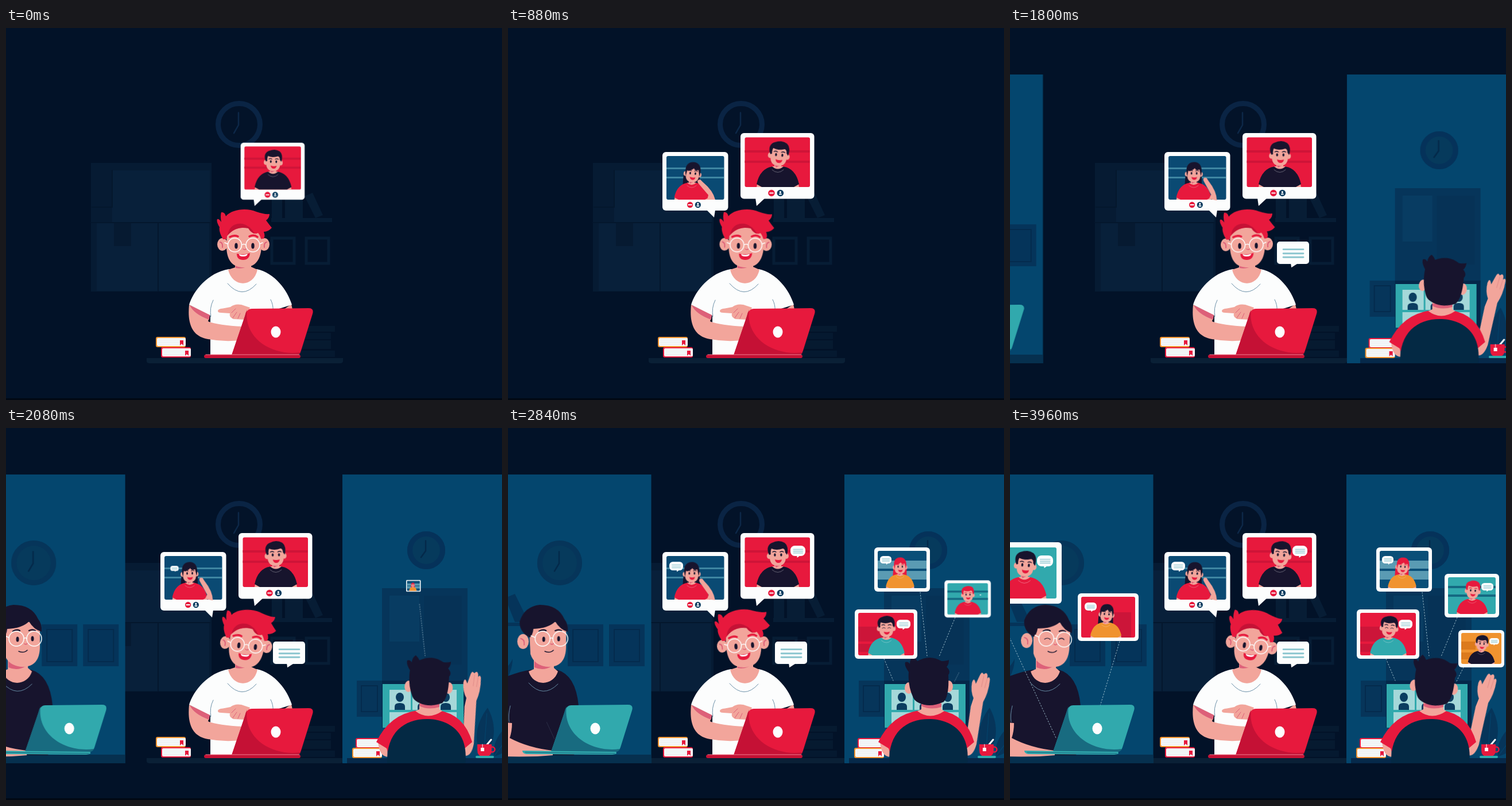
Recreate the animation shown at these times as an HTML page. Size 864 by 648 pixels, loop 4000 ms.

```html
<!DOCTYPE html>
<html lang="en">
<head>
<meta charset="utf-8">
<title>Video call</title>
<style>
html, body { margin: 0; width: 100%; height: 100%; overflow: hidden; background: #021228; }
svg { display: block; width: 100vw; height: 100vh; }
</style>
</head>
<body>
<svg id="stage" viewBox="0 0 864 648" fill="none"></svg>
<script>
const LOOP = 4000;
const RED = '#e7193d', DEEP = '#c51135', SKIN = '#f2a59b', PINK = '#dd6079', INK = '#17142d',
  WHITE = '#fcfdfd', NAVY = '#0b3d60', TEAL = '#31a9ad', ORANGE = '#f0932f', WALL = '#04466e';
const OUT = 'cubic-bezier(.5,1,.89,1)', SINE = 'cubic-bezier(.37,0,.63,1)';

// ---- drawing helpers ----
const path = (d, fill) => `<path d="${d}" fill="${fill}"/>`;
const line = (d, color, width = 1, extra = '') =>
  `<path d="${d}" stroke="${color}" stroke-width="${width}" stroke-linecap="round" ${extra}/>`;
const rect = (x, y, w, h, fill, r = 0) =>
  `<rect x="${x}" y="${y}" width="${w}" height="${h}" rx="${r}" fill="${fill}"/>`;
const oval = (x, y, rx, ry, fill) => `<ellipse cx="${x}" cy="${y}" rx="${rx}" ry="${ry}" fill="${fill}"/>`;
const ring = (x, y, r, color, width) =>
  `<circle cx="${x}" cy="${y}" r="${r}" stroke="${color}" stroke-width="${width}"/>`;
const frame = (x, y, w, h, color, width) =>
  `<rect x="${x}" y="${y}" width="${w}" height="${h}" stroke="${color}" stroke-width="${width}"/>`;

// ---- motion helpers ----
const moves = [];
function moving(body, keys, format, ease, origin = [0, 0]) {
  const id = 'm' + moves.length;
  moves.push({ id, keys, format, ease });
  return `<g id="${id}" style="transform-origin:${origin[0]}px ${origin[1]}px">${body}</g>`;
}
const scale = v => ({ transform: `scale(${v})` });
const rotate = v => ({ transform: `rotate(${v}deg)` });
const shift = v => ({ transform: `translateX(${v}px)` });
const fade = v => ({ opacity: v });
const pop = (body, x, y, start, length = 360, from = 0) =>
  moving(body, [[start, from], [start + length, 1]], scale, OUT, [x, y]);
const sway = (body, x, y, keys) => moving(body, keys, rotate, SINE, [x, y]);
const slide = (body, from, start, end) => moving(body, [[start, from], [end, 0]], shift, OUT);
const thread = (x1, y1, x2, y2, start) =>
  pop(line(`M${x1} ${y1}L${x2} ${y2}`, '#a3c2d0', .9, 'stroke-dasharray="2 3"'), x2, y2, start, 320);

// ---- shared props ----
function book(x, y, cover, mark) {
  const rules = [4, 7, 10, 13].map(d => line(`M${x + 4} ${y + d}H${x + 49}`, '#cfd8de', .7)).join('');
  return rect(x, y, 52, 18, cover, 3) + rect(x + 2, y + 2, 50, 14, WHITE, 2) + rules +
    path(`M${mark} ${y + 6}h6v9l-3 -3l-3 3Z`, RED);
}

function bubble(x, y, w, h, start, right) {
  const tip = x + w * (right ? .45 : .55);
  const rules = [.35, .53, .7].map(k =>
    line(`M${x + w * .2} ${y + h * k}H${x + w * .82}`, '#8cc6cf', h * .075)).join('');
  return pop(rect(x, y, w, h, WHITE, h * (h > 30 ? .13 : .42)) +
    path(`M${tip - w * .02} ${y + h - 1}L${tip} ${y + h * 1.16}L${tip + w * .2} ${y + h - 1}Z`, WHITE) + rules,
    tip, y + h * 1.16, start, 280);
}

const NOD = [[0, 2], [600, 6], [1400, 6], [1800, 1], [2440, -5], [3280, 5], [4000, 5]];
function avatar({ x, y, size, hair = INK, shirt, long, asleep, nod = NOD }) {
  const eye = ex => asleep ? line(`M${ex - 3} -55q3 -3 6 0`, INK, 1) : oval(ex, -56, 1.7, 2.8, INK);
  const head = oval(-15, -54, 4, 5, SKIN) + oval(15, -54, 4, 5, SKIN) +
    path('M-14 -68H14V-52C14 -41 8 -37 0 -37S-14 -41 -14 -52Z', SKIN) +
    (long
      ? path('M-14 -49C-20 -73 -10 -80 1 -80S20 -70 15 -50L12 -64Q4 -61 2 -67Q-5 -60 -12 -61Z', hair)
      : path('M-15 -56C-20 -66 -17 -74 -10 -77Q2 -83 12 -77Q20 -70 16 -56L13 -60Q13 -66 9 -67Q-2 -63 -11 -67Q-13 -62 -12 -57Z', hair)) +
    line('M-9 -61q3 -2 6 0M4 -61q3 -2 6 0', hair, 1.4) + eye(-5) + eye(6) +
    path('M-5 -48Q1 -46 7 -48Q6 -42 1 -42T-5 -48Z', RED);
  return `<g transform="translate(${x} ${y}) scale(${size})">` +
    (long ? path('M-17 -58L-20 -18H17L17 -58Z', hair) : '') +
    path('M-37 0L-35 -9H35L37 0Z', SKIN) +
    path('M-37 -5Q-31 -33 -8 -36H8Q31 -33 37 -5L28 0H-28Z', shirt) +
    path('M-6 -44H6V-36H10Q0 -27 -10 -36H-6Z', SKIN) + path('M-6 -39H6L-3 -34Z', PINK) +
    line('M-10 -30Q0 -21 10 -30', '#ffffff66', .8) +
    sway(head, 0, -38, nod) + '</g>';
}

function stripes(x, w, color, rows) {
  return rows.map(([y, h]) => rect(x, y, w, h, color)).join('');
}

function card({ x, y, w, h, bg, bands = '', who, talk, tail, start, from, origin, pad = 6, foot = 6 }) {
  const controls = tail ? (() => {
    const cx = x + w * .42, cy = y + h - 10, r = w * .045;
    return oval(cx, cy, r, r, RED) + rect(cx - 3.5, cy - 1, 7, 2, WHITE) +
      oval(cx + w * .12, cy, r, r, NAVY) + oval(cx + w * .12, cy - 1.5, 1.5, 2, WHITE) +
      rect(cx + w * .12 - 2.5, cy + 1, 5, 2, WHITE, 1);
  })() : '';
  const body = (tail ? path(tail, WHITE) : '') + rect(x, y, w, h, WHITE, 6) +
    rect(x + pad, y + pad, w - 2 * pad, h - pad - foot, bg, 3) + bands + avatar(who) +
    (who.extra || '') + controls + bubble(...talk);
  return pop(body, ...origin, start, 360, from);
}

function clock(x, y, r, rim, face, hands) {
  return oval(x, y, r, r, face) + ring(x, y, r - 4.5, rim, 9) +
    line(`M${x - 1} ${y - r / 2}V${y + 1}L${x - 9} ${y + r * .37}`, hands, 2.5);
}

function laptop(x, y, lid, shade) {
  return `<g transform="translate(${x} ${y})">` +
    path('M35 1L134 0Q144 0 141 10L121 74Q119 81 112 82H0L25 9Q28 1 35 1Z', lid) +
    path('M27 3Q24 8 23 14L0 82H112Q119 81 120 77C70 84 20 52 27 3Z', shade) +
    oval(77, 41.5, 8.5, 10, WHITE) + '</g>';
}

const glasses = (x1, x2, y, r, arms) => ring(x1, y, r, WHITE, 1.5) + ring(x2, y, r, WHITE, 1.5) +
  line(`M${x1 + r} ${y}q${(x2 - x1) / 2 - r} -3 ${x2 - x1 - 2 * r} 0${arms}`, WHITE, 1.4);

// ---- middle room ----
function middleRoom() {
  const dim = '#071d35', dark = '#04172d';
  return clock(406, 168, 41, '#0a2444', '#031329', '#0d2848') +
    rect(148, 235, 210, 224, '#061b33') + rect(185, 248, 170, 90, '#08203a') +
    rect(158, 340, 196, 118, '#08203a') + rect(188, 338, 30, 42, '#061a31') +
    line('M148 339H356M265 340V458M185 248V312H150', dark, 2) +
    rect(462, 331, 106, 7, dim) + rect(463, 296, 18, 35, dim) + rect(486, 292, 31, 39, dim) +
    path('M520 293L534 287L552 326L539 331Z', dim) +
    frame(463, 366, 39, 44, dim, 5) + frame(523, 366, 39, 44, dim, 5) +
    rect(515, 519, 58, 10, '#061a30') + rect(512, 531, 54, 11, '#051930') +
    rect(515, 544, 51, 15, '#061a30') + rect(510, 562, 63, 11, '#051930') +
    path('M245 575H587V580Q587 584 582 584H250Q245 584 245 580Z', '#0a2036');
}

function presenter() {
  const head = oval(377, 377, 9, 11, SKIN) + oval(450, 377, 9, 11, SKIN) +
    line('M373 373q5 1 4 9M454 373q-5 1 -4 9', PINK, 2) +
    path('M385 345H445V382C443 408 431 417 414 417S385 408 384 382Z', SKIN) +
    path('M378 368C372 358 371 350 372 347Q366 337 368 333Q371 332 375 338Q373 327 375 321Q381 320 383 328C394 315 420 313 436 320Q450 325 459 324Q459 331 453 335Q458 342 463 348Q457 355 449 355Q452 362 449 367H444Q442 360 439 357Q430 362 423 348C405 346 396 352 389 358Q384 362 384 368Z', RED) +
    path('M386 361Q390 339 412 341Q425 344 433 358Q427 357 422 349Q402 345 390 357Z', DEEP) +
    line('M390 364Q397 360 404 363M424 363Q432 359 438 364', RED, 3.5) +
    oval(401, 379.5, 2.7, 5, INK) + oval(430, 379.5, 2.7, 5, INK) +
    line('M413 385q3 2 5 0', PINK, 1.5) +
    path('M402 393Q414 396 425 392Q424 404 413 404T402 393Z', RED) +
    path('M406 394Q414 396 421 393.5Q420 398 413 398T406 394Z', WHITE) +
    glasses(398.5, 430, 378, 12, 'M386 376L381 374M442 376L447 374');
  return path('M484 490L497 481L499 490Z', SKIN) +
    path('M388 420C352 426 326 458 319 482L356 501V570H460L466 492L498 482C490 456 468 427 437 420Z', WHITE) +
    path('M399 402V417L387 421C394 452 431 453 438 421L427 416V402Z', SKIN) +
    path('M399 411H427Q414 421 400 418Z', PINK) +
    line('M386 445Q411 474 436 446M361 474Q354 488 357 503M461 473Q466 483 465 492', '#6d91a9', 1) +
    path('M319 482C316 512 322 537 352 542Q380 547 408 544L412 520Q370 518 352 511L355 500Z', SKIN) +
    path('M320 483L355 500L354 508Q328 499 320 483Z', PINK) +
    path('M369 493Q369 489 378 488.500L391 486Q398 480 410 482L425 487L416 508L396 507Q388 503 390 497L375 496Q369 496 369 493Z', SKIN) +
    line('M393 496L400 489M395 505L402 495M404 506L408 497', PINK, 1) +
    laptop(393, 488, RED, DEEP) + rect(345, 569, 168, 6, DEEP, 3) + line('M348 569H511', '#f0808f', 1) +
    book(261, 538, ORANGE, 303) + book(270, 556, RED, 312) +
    sway(head, 412, 425, [[0, 0], [450, 8], [1350, -8], [2380, 9], [3020, -8], [3900, 9]]);
}

function middleCards() {
  const arm = sway(path('M347 299L349 291L331 270Q328 264 335 264L340 269Q357 283 361 299Z', SKIN), 353, 297,
    [[0, 0], [1400, 0], [1750, 12], [2500, 12], [3150, 0], [3450, 0], [3900, 12]]);
  return card({
    x: 405, y: 183, w: 128.5, h: 114.5, pad: 7.5, foot: 20.5, bg: RED, tail: 'M431 296L433 310L448 296Z',
    bands: stripes(412.5, 113, '#cf1438', [[213, 4], [231, 4]]),
    who: { x: 470, y: 277, size: 1, shirt: INK }, talk: [492, 205, 26, 18, 2100, true],
    start: 0, from: .867, origin: [433, 310]
  }) + card({
    x: 269, y: 216, w: 114.5, h: 102, pad: 7, foot: 19, bg: '#0a4a73', tail: 'M346 317L359 330L361 317Z',
    bands: stripes(276, 100, '#3f86a2', [[243, 3], [259, 3]]),
    who: { x: 320, y: 299, size: .82, shirt: RED, long: true, extra: arm },
    talk: [281, 233, 24, 15, 1980], start: 340, origin: [359, 330]
  }) + bubble(465, 372, 56, 39, 1170, true);
}

// ---- left room ----
function leftRoom() {
  const dark = '#05345a', deep = '#042b4d';
  const eyes = oval(62, 368, 2.5, 4.500, INK) + oval(88, 367, 2.5, 4.500, INK);
  const shut = line('M57 368q5 -4 10 0M82 367q5 -4 9 0', INK, 1.2);
  const head = path('M36 338H101V380C101 405 90 416 71 416Q46 415 39 394Z', SKIN) +
    oval(26, 372, 10, 13, SKIN) + line('M22 367q7 1 6 11', PINK, 1.8) +
    path('M34 363Q19 353 20 337Q28 311 55 308Q87 308 98 333Q105 341 104 355Q90 351 82 337Q70 349 44 350Q43 360 38 365Z', INK) +
    line('M54 354Q61 350 66 353M82 353Q88 350 93 353', INK, 2.4) +
    moving(eyes, [[3860, 1], [3861, 0]], fade, 'linear') + moving(shut, [[3860, 0], [3861, 1]], fade, 'linear') +
    line('M74 376q4 2 5 -1', PINK, 1.4) + line('M64 389Q73 393 79 387', INK, 1.5) +
    glasses(60, 91, 367, 13, 'M47 365L40 362');
  const room = rect(-60, 81, 309.5, 503, WALL) +
    clock(90, 235, 39, '#06355a', '#063a5c', '#04294a') +
    rect(-40, 339, 82, 6, dark) + path('M-5 296L12 289L36 338H12Z', dark) +
    rect(104, 342, 62, 73, dark) + frame(113, 351, 44, 56, deep, 2) +
    rect(176, 342, 62, 73, dark) + frame(185, 351, 44, 56, deep, 2) +
    path('M-20 430Q0 420 8 402Q8 425 -10 450Z', dark) +
    rect(-60, 569, 309.5, 15, '#06304f');
  const body = path('M-60 450L0 432Q25 423 40 421H85Q118 430 123 484L115 570H-60Z', INK) +
    path('M45 396V420L36 424C44 451 79 450 87 424L80 418V400Z', SKIN) +
    path('M46 405Q60 418 76 415Q62 424 46 417Z', PINK) +
    line('M36 444Q61 472 87 446M4 484Q0 500 2 512', '#668ba4', 1) +
    path('M-60 508L7 514Q7 528 3 540Q35 557 78 562V570Q30 575 -60 570Z', SKIN);
  const base = path('M25 562L188 564Q192 568 182 569L32 568Q25 567 25 562Z', TEAL) + line('M30 565L186 567', '#15607a', 1);
  return room + body + thread(-28, 306, 81, 542, 2820) + thread(191, 372, 157, 484, 3040) +
    laptop(75, 482, TEAL, '#186b80') + base +
    sway(head, 62, 430, [[1720, -6], [2450, 6], [3250, -6], [4000, 3]]) +
    card({
      x: -40, y: 199, w: 130, h: 107, pad: 9, foot: 9, bg: TEAL,
      who: { x: 25, y: 297, size: 1.04, shirt: RED }, talk: [47, 222, 28, 19, 3000, true],
      start: 3050, origin: [-10, 306]
    }) + card({
      x: 118, y: 288, w: 106, h: 83, bg: RED,
      bands: rect(155, 321, 56, 44, '#cc1539'),
      who: { x: 167, y: 365, size: .73, shirt: ORANGE, long: true }, talk: [130, 304, 21, 14, 3480],
      start: 3330, origin: [191, 371]
    });
}

// ---- right room ----
function rightRoom() {
  const dark = '#06355a', deep = '#04284a';
  const tile = (x, y) => rect(x, y, 37, 35, '#a5d8d9') + oval(x + 18, y + 13, 7, 8, NAVY) +
    path(`M${x + 9} ${y + 35}v-6q0 -6 9 -6t9 6v6Z`, NAVY);
  const tiles = [668, 708, 748].map(x => tile(x, 456) + rect(x, 495, 37, 20, '#a5d8d9')).join('');
  const leaf = (x, y, turn) => `<g transform="translate(${x} ${y}) rotate(${turn})">` +
    path('M0 0C-22 -25 -14 -60 4 -85C22 -55 20 -22 0 0Z', dark) + line('M0 0L3 -75', WALL, 1) + '</g>';
  const head = oval(698, 453, 7, 10, SKIN) + oval(768, 450, 7, 10, SKIN) +
    path('M706 470Q696 448 698 425Q690 414 692 408Q697 406 700 411Q700 402 706 398Q711 402 713 406Q735 394 755 406Q763 406 768 404Q768 412 764 416Q772 424 767 430Q769 466 759 477Q735 488 716 479Q709 476 706 470Z', INK);
  const arm = path('M782 488L792 545L797 572Q813 574 812 548L800 474Q804 455 799 433Q796 427 794 433L793 428Q790 421 786 428Q781 423 780 432L778 448Q771 436 771 448Q773 463 782 473Z', SKIN) +
    line('M787 430L789 450M794 434L795 450', '#e08b88', 1);
  return clock(732, 213, 33, '#05325a', '#063a5c', '#04294a') +
    rect(655, 279, 149, 165, dark) + rect(668, 292, 52, 80, '#083c62') + rect(728, 292, 66, 120, '#063256') +
    rect(611, 440, 45, 63, dark) + frame(619, 449, 28, 45, deep, 1.5) +
    leaf(832, 572, 2) + leaf(850, 572, 34) + rect(594, 575, 330, 9, '#06294a') +
    rect(655, 440, 149, 82, deep) + rect(656, 446, 141, 76, TEAL) + tiles +
    thread(718, 286, 730, 397, 1900) + thread(655, 402, 671, 440, 2230) +
    thread(779, 330, 751, 398, 2460) + thread(790, 417, 778, 441, 2720) +
    book(609, 540, RED, 651) + book(603, 557, ORANGE, 645) +
    sway(arm, 804, 562, [[1300, 0], [1800, 22], [2420, 0], [3000, 22], [3560, 0], [3980, 22]]) +
    path('M648 546L664 555L665 573Q650 572 648 546Z', SKIN) +
    path('M645 547Q668 499 716 492H754Q798 499 812 547L799 558L790 584H672L663 558Z', RED) +
    path('M720 474V490L713 493Q735 510 760 493L755 490V474Z', SKIN) + path('M720 480H755V486Q735 492 720 484Z', PINK) +
    path('M664 584C662 530 694 507 733 507S806 530 800 584Z', '#042944') +
    sway(head, 735, 490, [[1300, 0], [1800, 8], [2450, 0], [3280, 0], [3960, 8]]) +
    line('M835 555L845 543', WHITE, 3) + ring(847, 560, 4.5, RED, 2.5) +
    path('M821 551H846V561Q846 572 837 572H830Q821 572 821 561Z', RED) +
    rect(827, 557, 6, 6, WHITE) + line('M830 551V557', WHITE, 1) + rect(818, 571, 32, 4, TEAL, 2) +
    card({
      x: 638, y: 208, w: 97, h: 77, bg: '#0a4f78',
      bands: stripes(644, 85, '#5a9bb3', [[231, 14], [249, 15]]),
      who: { x: 683, y: 279, size: .67, hair: RED, shirt: ORANGE, long: true }, talk: [648, 223, 20, 13, 2160],
      start: 2030, origin: [718, 285]
    }) + card({
      x: 604, y: 316, w: 109, h: 86, bg: RED,
      bands: stripes(610, 50, '#cc1539', [[346, 26], [376, 14]]),
      who: { x: 659, y: 396, size: .86, shirt: TEAL, asleep: true }, talk: [677, 334, 24, 15, 2560, true],
      start: 2330, origin: [658, 401]
    }) + card({
      x: 757, y: 254, w: 95, h: 76, bg: TEAL,
      bands: stripes(763, 83, '#146982', [[275, 4], [290, 4]]),
      who: { x: 805, y: 324, size: .73, hair: RED, shirt: RED }, talk: [821, 270, 21, 13, 2820, true],
      start: 2620, origin: [779, 330]
    }) + card({
      x: 781, y: 352, w: 80, h: 65, pad: 5, foot: 6, bg: ORANGE,
      bands: stripes(786, 25, '#dc7a1c', [[372, 14], [391, 12]]),
      who: { x: 821, y: 411, size: .63, shirt: INK }, talk: [835, 366, 17, 11, 3000, true],
      start: 2870, origin: [790, 417]
    });
}

document.getElementById('stage').innerHTML =
  rect(0, 0, 864, 648, '#021228') + middleRoom() + presenter() +
  slide(rect(586, 81, 320, 503, WALL), 280, 1255, 1840) +
  slide(rightRoom(), 274, 1255, 1975) +
  slide(leftRoom(), -252, 1725, 2325) +
  middleCards() + rect(0, 645, 864, 3, '#010914');

const running = moves.map(({ id, keys, format, ease }) => {
  const all = [...keys];
  if (all[0][0] > 0) all.unshift([0, all[0][1]]);
  if (all.at(-1)[0] < LOOP) all.push([LOOP, all.at(-1)[1]]);
  const steps = all.map(([ms, value]) => ({ ...format(value), offset: ms / LOOP, easing: ease }));
  return document.getElementById(id).animate(steps, { duration: LOOP, iterations: Infinity });
});
running.forEach(a => { a.startTime = document.timeline.currentTime; });
</script>
</body>
</html>
```
